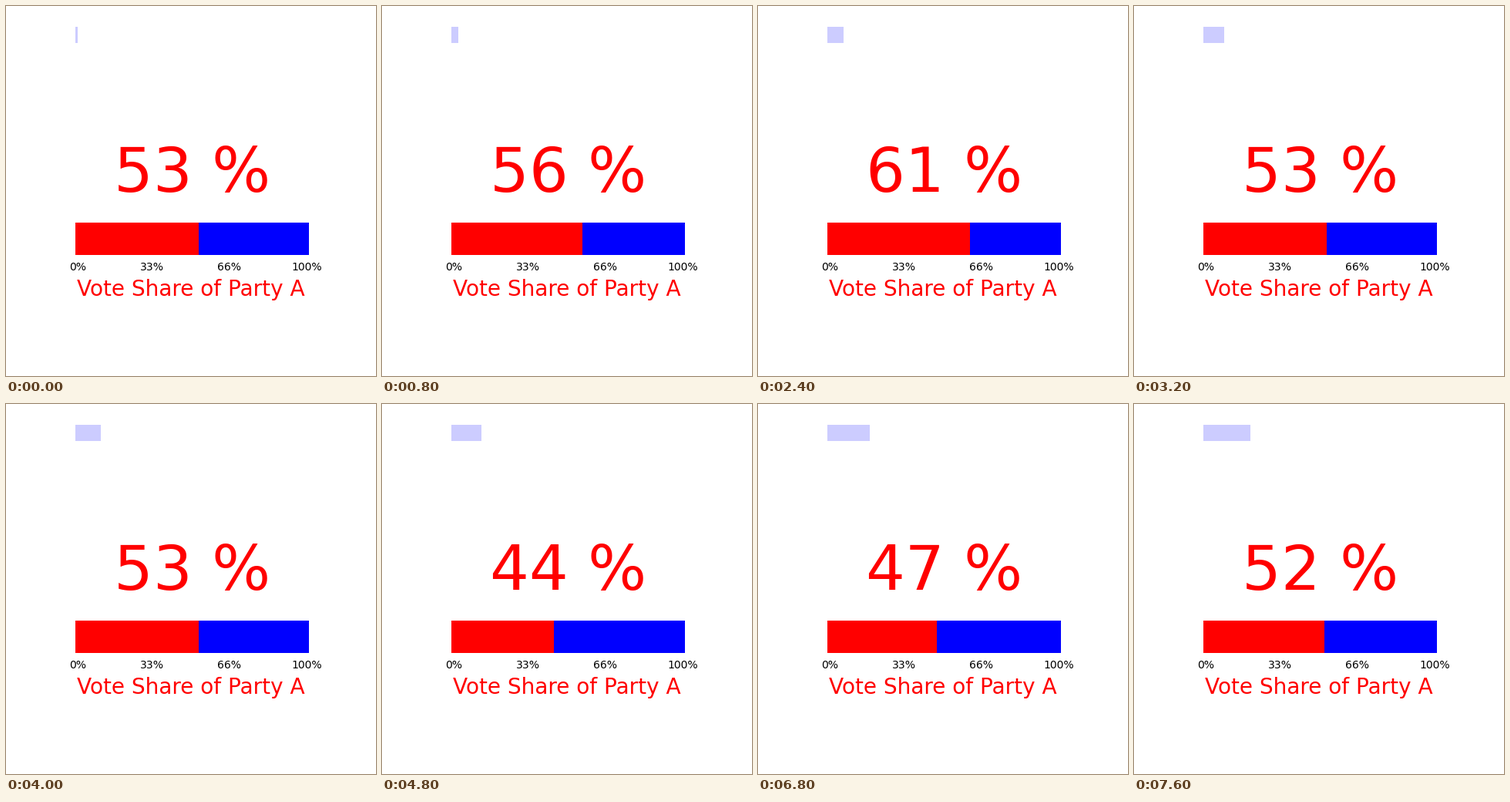
A matplotlib script that plays this animation: 480x480 px, repeating every 8000 ms.

```python
import matplotlib.pyplot as plt
from matplotlib.animation import FuncAnimation
from matplotlib.patches import Rectangle

SIZE, DPI = 480, 96
LEFT, UNIT = 90, 3.028  # pixel position of 0 % and width of 1 %
SHARES = [53, 56, 56, 47, 50, 46, 61, 47, 53, 48,
          53, 47, 44, 56, 57, 47, 56, 47, 50, 52]

plt.rcParams["font.family"] = "DejaVu Sans"
fig = plt.figure(figsize=(SIZE / DPI, SIZE / DPI), dpi=DPI, facecolor="white")
ax = fig.add_axes([0, 0, 1, 1])
ax.set(xlim=(0, SIZE), ylim=(SIZE, 0))
ax.axis("off")


def width(percent):
    return round(LEFT + UNIT * percent) - LEFT


def bar(top, height, percent, color):
    return ax.add_patch(Rectangle((LEFT, top), width(percent), height,
                                  facecolor=color, linewidth=0))


def label(x, baseline, text, pixels, color="black"):
    return ax.text(x, baseline, text, fontsize=pixels * 72 / DPI, color=color,
                   ha="left", va="baseline")


progress = bar(27, 21, 1, "#ccccff")
bar(281, 42, 100, "#0000ff")
share_bar = bar(281, 42, SHARES[0], "#ff0000")
number = label(140, 241, "", 80, "#ff0000")
label(92, 376, "Vote Share of Party A", 28, "#ff0000")
for x, text in [(82, "0%"), (174, "33%"), (274, "66%"), (370, "100%")]:
    label(x, 343, text, 14)


def update(frame):
    share = SHARES[frame]
    progress.set_width(width(frame + 1))
    share_bar.set_width(width(share))
    number.set_text(f"{share} %")
    return progress, share_bar, number


anim = FuncAnimation(fig, update, frames=len(SHARES), interval=400,
                     repeat=True, repeat_delay=0)
plt.show()
```
